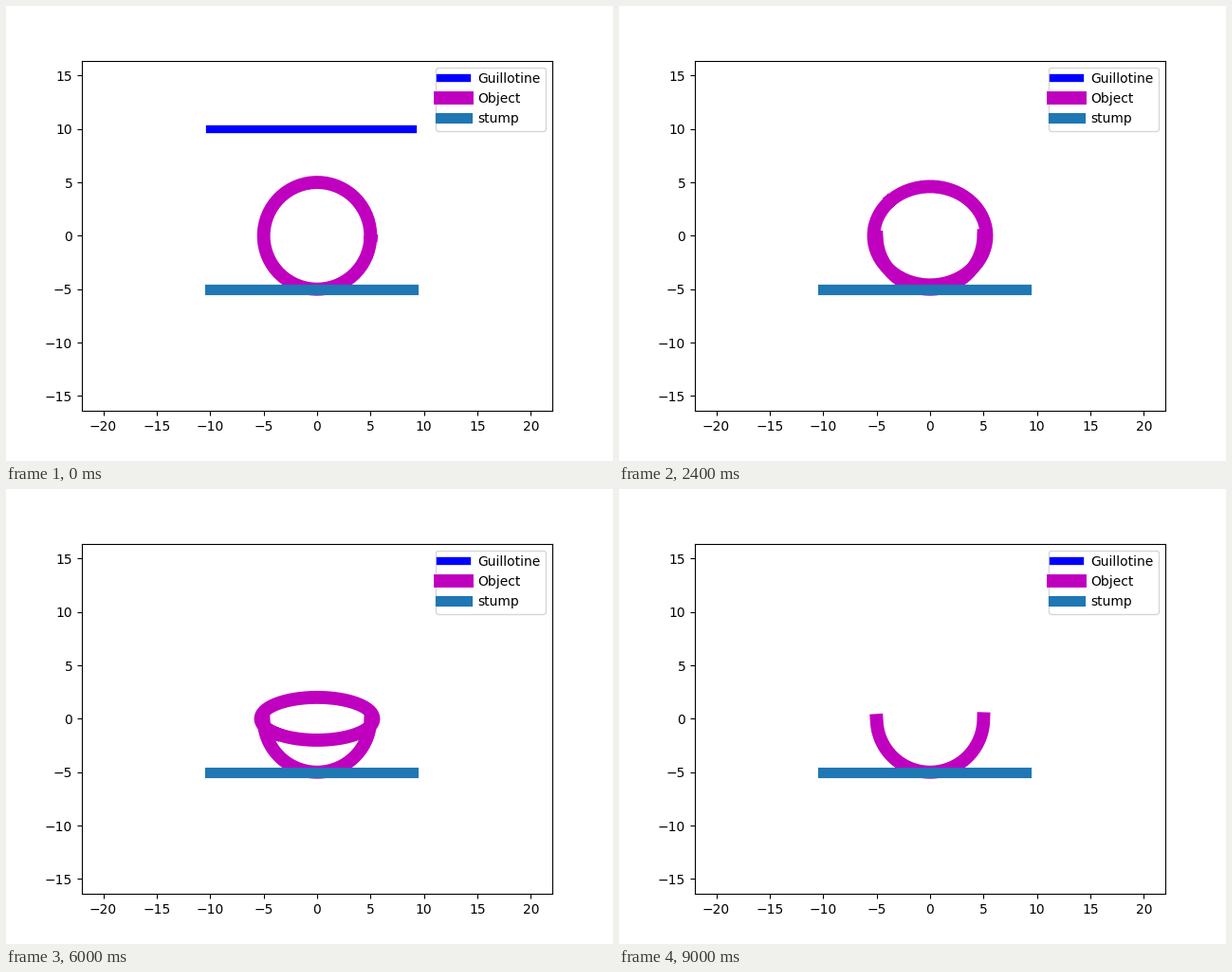
These frames come from a looping animation (640x480 px, 10000 ms). A matplotlib script:

```python
import numpy as np
import matplotlib.pyplot as plt
from matplotlib.animation import FuncAnimation

FRAMES, STEP_MS = 100, 100
LAND, CUT, GONE = 15, 17, 90

# Height of the tumbling ring (half axis, signed) at a few frame numbers
KEY_N = np.array([17, 27, 32, 38, 44, 60, 65, 72, 82, 90])
KEY_R = np.array([6.19, 3.95, 2.9, 1.82, 0.78, -2.0, -2.94, 0.54, 1.19, 0.0])


def key_slopes():
    """Harmonic-mean slopes: smooth, with no overshoot at the turning points."""
    d = np.diff(KEY_R) / np.diff(KEY_N)
    inner = [2 * a * b / (a + b) if a * b > 0 else 0 for a, b in zip(d, d[1:])]
    return np.array([d[0], *inner, d[-1]])


SLOPES = key_slopes()


def ring_height(n):
    i = min(np.searchsorted(KEY_N, n, side="right") - 1, len(KEY_N) - 2)
    h = KEY_N[i + 1] - KEY_N[i]
    u = (n - KEY_N[i]) / h
    return ((1 + 2 * u) * (1 - u) ** 2 * KEY_R[i] + u * (1 - u) ** 2 * h * SLOPES[i]
            + u * u * (3 - 2 * u) * KEY_R[i + 1] + u * u * (u - 1) * h * SLOPES[i + 1])


def ellipse(t, a, b):
    return a * np.cos(t), b * np.sin(t)


whole = ellipse(np.arange(0, 2 * np.pi, 0.1), 5, 5)
lower = ellipse(np.linspace(0, 2 * np.pi, 100)[50:], 5, 5)
ring_t = np.arange(2.4, 2.4 + 2 * np.pi, 0.1)

fig, ax = plt.subplots(figsize=(6.4, 4.8), dpi=100)
ax.set_xlim(-22, 22)
ax.set_ylim(-16.4, 16.4)

span = [-10, 9]
blade, = ax.plot(span, [10, 10], "b", lw=6, label="Guillotine")
body, = ax.plot(*whole, "m", lw=10, label="Object")
ring, = ax.plot([], [], "m", lw=10)
ax.plot(span, [-5, -5], color="C0", lw=8, label="stump")
ax.legend(loc="upper right")


def update(n):
    blade.set_ydata([10 - min(n, LAND)] * 2)
    body.set_data(*(whole if n < CUT else lower))
    if CUT <= n < GONE:
        ring.set_data(*ellipse(ring_t, 5.28, ring_height(n)))
    else:
        ring.set_data([], [])
    return blade, body, ring


anim = FuncAnimation(fig, update, frames=FRAMES, interval=STEP_MS,
                     init_func=lambda: update(0), repeat=True, repeat_delay=0)
plt.show()
```
